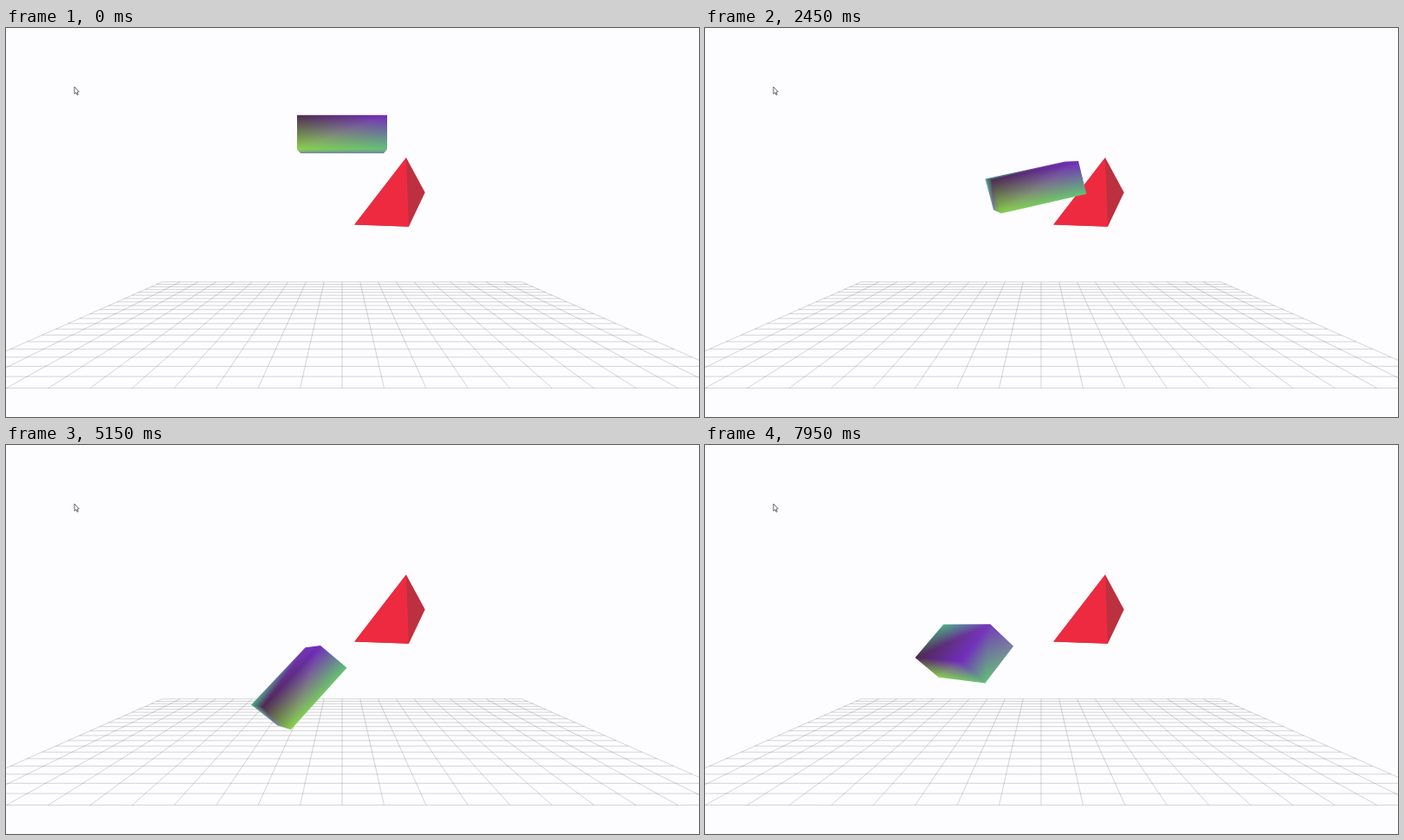
These frames come from a looping animation (800 px wide and 450 px high, 8 s). An HTML page with a canvas:

```html
<!DOCTYPE html>
<html lang="en">
<head>
<meta charset="utf-8">
<title>Falling box</title>
<style>
  html, body { margin: 0; width: 100%; height: 100%; overflow: hidden; background: #fdfcfe; }
  canvas { display: block; width: 800px; height: 450px; }
</style>
</head>
<body>
<canvas id="stage" width="800" height="450"></canvas>
<script>
const ctx = document.getElementById('stage').getContext('2d');
const LOOP = 8000, STEP = 50;

// Camera sits at the origin and looks down -z; the picture is slightly squashed.
const FOCAL_X = 728, FOCAL_Y = 655, CX = 388, CY = 201.6, DEPTH = 25;
const project = ([x, y, z]) => [CX - FOCAL_X * x / z, CY + FOCAL_Y * y / z];
const unproject = (x, y) => [(x - CX) * DEPTH / FOCAL_X, (CY - y) * DEPTH / FOCAL_Y, -DEPTH];

const dot = (a, b) => a.reduce((sum, v, i) => sum + v * b[i], 0);
const scale = (a, k) => a.map(v => v * k);
const unit = a => scale(a, 1 / Math.sqrt(dot(a, a)));
const add = (a, b) => a.map((v, i) => v + b[i]);
const cross = (a, b) => [
  a[1] * b[2] - a[2] * b[1], a[2] * b[0] - a[0] * b[2], a[0] * b[1] - a[1] * b[0]];
const mix = (a, b, u) => a + (b - a) * u;

// Quaternion [x, y, z, w] from the box's right and front directions.
function facing(right, front) {
  const a = unit(right), b = unit(cross(front, a)), c = cross(a, b);
  const w = Math.sqrt(1 + a[0] + b[1] + c[2]) / 2;
  return [...scale([b[2] - c[1], c[0] - a[2], a[1] - b[0]], 1 / (4 * w)), w];
}

function rotate(q, v) {
  const t = scale(cross(q, v), 2);
  return add(add(v, scale(t, q[3])), cross(q, t));
}

function slerp(p, q, u, longWay) {
  if ((dot(p, q) < 0) !== !!longWay) q = scale(q, -1);
  const angle = Math.acos(Math.max(-1, Math.min(1, dot(p, q))));
  if (angle < 1e-4) return p;
  return scale(add(scale(p, Math.sin((1 - u) * angle)), scale(q, Math.sin(u * angle))),
    1 / Math.sin(angle));
}

// Ballistic arcs join the moments of contact.
const GRAVITY = 11;
const CONTACTS = [
  { t: 0, x: 388, y: 123.7 },
  { t: 2, x: 388, y: 166.6 },
  { t: 4.45, x: 348, y: 283 },
  { t: 6.75, x: 314, y: 291 },
  { t: 7.95, x: 298, y: 239.5 }
];

const REST = facing([1, 0, 0], [0, 0, 1]);
const SPINS = [
  { t: 0, q: REST },
  { t: 2, q: REST },
  { t: 2.45, q: facing([.95, .24, -.2], [.22, -.06, .97]) },
  { t: 4.45, q: facing([.29, .95, -.07], [.92, -.28, .28]) },
  { t: 5.85, q: facing([.9, .46, -.06], [-.31, .69, .64]), longWay: true },
  { t: 6.95, q: facing([-.98, .07, -.17], [-.17, -.69, .7]) },
  { t: 7.95, q: facing([.63, .01, .77], [-.52, -.75, .42]) }
];

// The last span carries on past its end.
function spanAt(keys, t) {
  const next = keys.findIndex(key => key.t > t);
  const i = next < 0 ? keys.length - 1 : next;
  const from = keys[i - 1], to = keys[i], length = to.t - from.t;
  return { from, to, length, u: (t - from.t) / length };
}

function boxPose(t) {
  const { from, to, length, u } = spanAt(CONTACTS, t);
  const lift = GRAVITY / 2 * length * length * u * (1 - u);
  const spin = spanAt(SPINS, t);
  return {
    centre: unproject(mix(from.x, to.x, u), mix(from.y, to.y, u) - lift),
    turn: slerp(spin.from.q, spin.to.q, spin.u, spin.from.longWay)
  };
}

// Corner bits: 1 right, 2 top, 4 front. Each face is split between its first and third corner.
const HALF = [1.715, .725, 1];
const COLORS = ['7c8c98', '7a80a0', '4cb088', '7638ba', '88d04c', '62c078', '4e2a50', '702cbc']
  .map(hex => [0, 2, 4].map(i => parseInt(hex.slice(i, i + 2), 16)));
const FACES = [
  { n: [0, 0, 1], ids: [4, 5, 7, 6] }, { n: [0, 0, -1], ids: [1, 0, 2, 3] },
  { n: [0, 1, 0], ids: [6, 7, 3, 2] }, { n: [0, -1, 0], ids: [0, 1, 5, 4] },
  { n: [1, 0, 0], ids: [5, 1, 3, 7] }, { n: [-1, 0, 0], ids: [0, 2, 6, 4] }];

const SIZE = 160;
const patch = document.createElement('canvas');
patch.width = patch.height = SIZE;
const patchCtx = patch.getContext('2d');

// Blends corner colours over a triangle, spilling `spill` pixels past its edges.
function shade(image, points, colors, spill) {
  const [[ax, ay], [bx, by], [cx, cy]] = points;
  const area = (bx - ax) * (cy - ay) - (cx - ax) * (by - ay);
  if (Math.abs(area) < 1) return;
  const slack = points.map((_, i) => {
    const p = points[(i + 1) % 3], q = points[(i + 2) % 3];
    return -spill * Math.hypot(q[0] - p[0], q[1] - p[1]) / Math.abs(area);
  });
  const range = axis => {
    const v = points.map(p => p[axis]);
    return [Math.max(0, Math.floor(Math.min(...v) - spill)),
            Math.min(SIZE - 1, Math.ceil(Math.max(...v) + spill))];
  };
  const [x0, x1] = range(0), [y0, y1] = range(1);
  for (let y = y0; y <= y1; y++) for (let x = x0; x <= x1; x++) {
    const px = x + .5, py = y + .5;
    const u = ((bx - px) * (cy - py) - (cx - px) * (by - py)) / area;
    const v = ((cx - px) * (ay - py) - (ax - px) * (cy - py)) / area;
    const w = 1 - u - v;
    if (u < slack[0] || v < slack[1] || w < slack[2]) continue;
    const at = (y * SIZE + x) * 4;
    for (let k = 0; k < 3; k++)
      image.data[at + k] = u * colors[0][k] + v * colors[1][k] + w * colors[2][k];
    image.data[at + 3] = 255;
  }
}

function polygon(points) {
  points.forEach(([x, y], i) => i ? ctx.lineTo(x, y) : ctx.moveTo(x, y));
  ctx.closePath();
}

function fillPolygon(points, color) {
  ctx.fillStyle = color;
  ctx.beginPath();
  polygon(points);
  ctx.fill();
}

function drawBox(t) {
  const { centre, turn } = boxPose(t);
  const place = v => add(centre, rotate(turn, v));
  const corners = COLORS.map((_, i) =>
    project(place(HALF.map((h, axis) => i >> axis & 1 ? h : -h))));
  const visible = FACES.filter(({ n }) =>
    dot(rotate(turn, n), place(n.map((v, i) => v * HALF[i]))) < 0);

  const [left, top] = project(centre).map(v => Math.round(v - SIZE / 2));
  const local = corners.map(([x, y]) => [x - left, y - top]);
  const image = patchCtx.createImageData(SIZE, SIZE);
  for (const spill of [2, 0]) for (const { ids: [a, b, c, d] } of visible)
    for (const tri of [[a, b, c], [a, c, d]])
      shade(image, tri.map(i => local[i]), tri.map(i => COLORS[i]), spill);
  patchCtx.putImageData(image, 0, 0);

  ctx.save();
  ctx.beginPath();
  visible.forEach(({ ids }) => polygon(ids.map(i => corners[i])));
  ctx.clip();
  ctx.drawImage(patch, left, top);
  ctx.restore();
}

function drawGrid() {
  const floor = -4.93, near = -15.02, half = 10;
  ctx.strokeStyle = 'rgba(60, 60, 60, .3)';
  ctx.lineWidth = .7;
  ctx.beginPath();
  const line = (a, b) => {
    ctx.moveTo(...project(a));
    ctx.lineTo(...project(b));
  };
  for (let i = 0; i <= 2 * half; i++) {
    line([i - half, floor, near], [i - half, floor, near - 2 * half]);
    line([-half, floor, near - i], [half, floor, near - i]);
  }
  ctx.stroke();
}

function drawPyramid() {
  const apex = [462, 150], foot = [465, 229.7], left = [402.3, 227.4];
  fillPolygon([apex, [483.7, 190.3], foot, left], '#bc303f');
  fillPolygon([apex, foot, left], '#ee2a41');
}

function drawCursor() {
  ctx.strokeStyle = '#55555c';
  ctx.lineWidth = .9;
  fillPolygon([[79, 68], [79, 76.3], [80.9, 74.7], [82.2, 77.5], [83.3, 77], [82.1, 74.2], [84.3, 73.8]], '#fff');
  ctx.stroke();
}

function render(ms) {
  ctx.fillStyle = '#fdfcfe';
  ctx.fillRect(0, 0, 800, 450);
  drawGrid();
  drawPyramid();
  drawBox(ms / 1000);
  drawCursor();
}

const start = performance.now();
function tick() {
  const ms = (performance.now() - start) % LOOP;
  render(Math.floor(ms / STEP) * STEP);
  requestAnimationFrame(tick);
}
tick();
</script>
</body>
</html>
```
